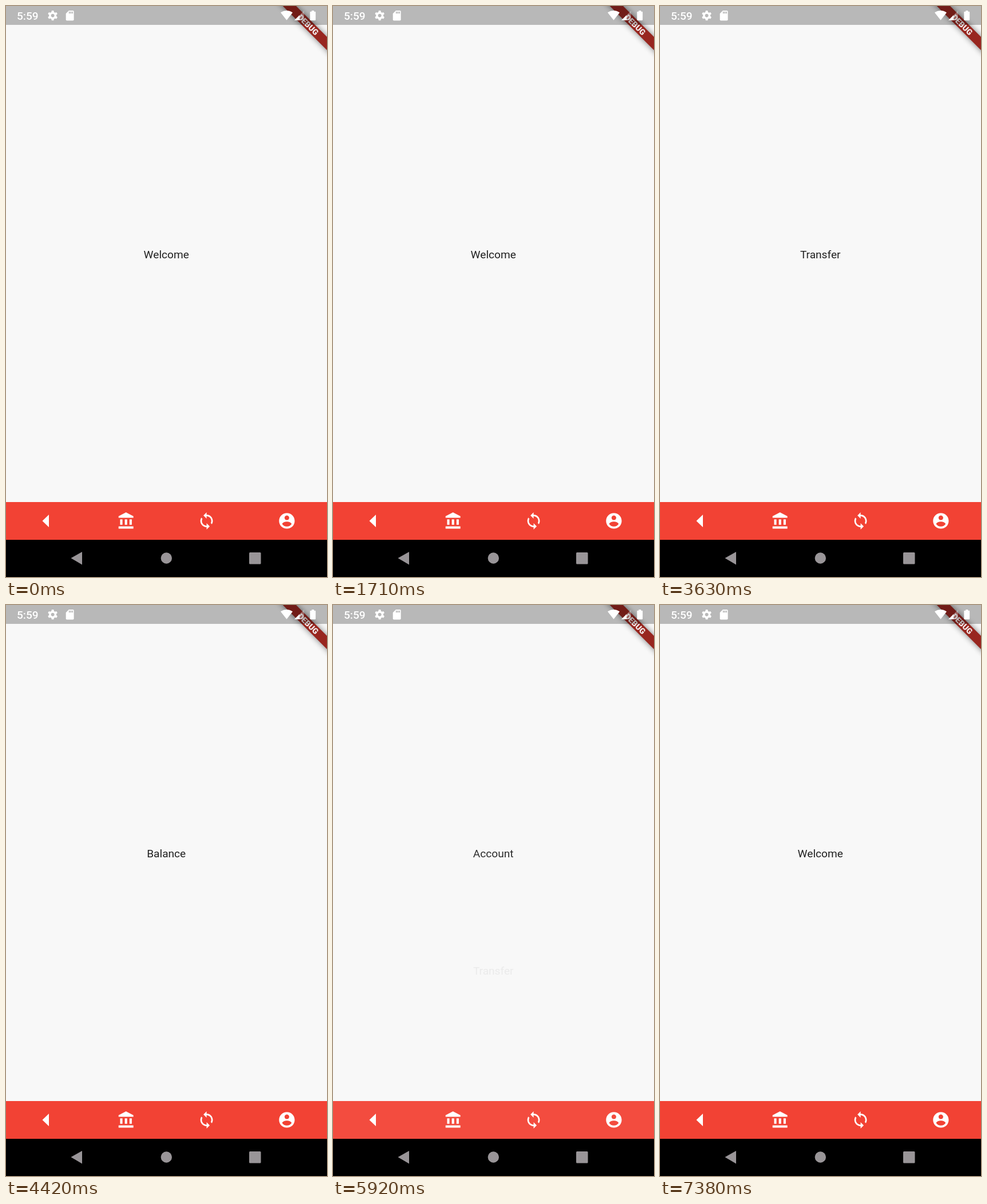
Animation of 561x998 px, one loop 7500 ms. Source, as an HTML page:

```html
<!DOCTYPE html>
<html lang="en">
<head>
<meta charset="utf-8">
<title>Page navigation</title>
<style>
html, body { margin: 0; width: 100%; height: 100%; overflow: hidden; background: #f8f8f8; }
svg { display: block; width: 561px; height: 998px; }
text { font-family: Roboto, sans-serif; }
.label { font-size: 19.1px; fill: #000; fill-opacity: .87; text-anchor: middle; }
.clock { font-size: 19.1px; font-weight: 500; fill: #fff; }
.debug { font-size: 13.9px; font-weight: 900; fill: #f4eeee; text-anchor: middle; }
</style>
</head>
<body>
<svg viewBox="0 0 561 998">
  <defs>
    <filter id="blur" x="-30%" y="-150%" width="160%" height="400%">
      <feGaussianBlur stdDeviation="5.2"/>
    </filter>
    <g id="bar">
      <rect y="867" width="561" height="66" fill="#f24234"/>
      <g fill="#fff">
        <path d="M63.5 900L75 889V911Z"/>
        <path transform="translate(194 883.6) scale(1.364)" d="M4 10v7h3v-7H4zm6 0v7h3v-7h-3zM2 22h19v-3H2v3zm14-12v7h3v-7h-3zm-4.5-9L2 6v2h19V6l-9.5-5z"/>
        <path transform="translate(334.2 883.6) scale(1.364)" d="M12 4V1L8 5l4 4V6c3.31 0 6 2.69 6 6 0 1.01-.25 1.97-.7 2.8l1.46 1.46C19.54 15.03 20 13.57 20 12c0-4.42-3.58-8-8-8zm0 14c-3.31 0-6-2.69-6-6 0-1.01.25-1.97.7-2.8L5.24 7.74C4.46 8.97 4 10.43 4 12c0 4.42 3.58 8 8 8v3l4-4-4-4v3z"/>
        <path transform="translate(474.5 883.6) scale(1.364)" d="M12 2C6.48 2 2 6.48 2 12s4.48 10 10 10 10-4.48 10-10S17.52 2 12 2zm0 3c1.66 0 3 1.34 3 3s-1.34 3-3 3-3-1.34-3-3 1.34-3 3-3zm0 14.2c-2.5 0-4.71-1.28-6-3.22.03-1.99 4-3.08 6-3.08 1.99 0 5.97 1.09 6 3.08-1.29 1.94-3.5 3.22-6 3.22z"/>
      </g>
    </g>
    <path id="tooth" d="M-2.4 -5L-1.7 -8.6H1.7L2.4 -5Z"/>
  </defs>

  <g id="pages"></g>

  <g transform="translate(561 0) rotate(45)">
    <rect x="-70" y="38.2" width="140" height="16.4" opacity=".5" filter="url(#blur)"/>
    <rect x="-70" y="38.2" width="140" height="16.4" fill="#98261f"/>
    <text class="debug" x="0" y="51.4">DEBUG</text>
  </g>

  <rect width="561" height="33" fill-opacity=".26"/>
  <text class="clock" x="19" y="24">5:59</text>
  <g fill="#fff">
    <g id="gear" transform="translate(81.6 16.7)">
      <circle r="4.7" fill="none" stroke="#fff" stroke-width="3.4"/>
    </g>
    <path transform="translate(101.2 6.3) scale(.87)" d="M18 2h-8L4.02 8 4 20c0 1.1.9 2 2 2h12c1.1 0 2-.9 2-2V4c0-1.1-.9-2-2-2zm-6 6h-2V4h2v4zm3 0h-2V4h2v4zm3 0h-2V4h2v4z"/>
    <path transform="translate(479.7 5.3) scale(.9)" d="M12.01 21.49L23.64 7c-.45-.34-4.93-4-11.64-4C5.28 3 .81 6.66.36 7l11.63 14.49z"/>
    <path d="M504 25L521 8V25Z" opacity=".3"/>
    <path d="M504 25L513 16V25Z"/>
    <path transform="translate(524.5 6.3) scale(.98 .86)" d="M15.67 4H14V2h-4v2H8.33C7.6 4 7 4.6 7 5.33v15.33C7 21.4 7.6 22 8.33 22h7.33c.74 0 1.34-.6 1.34-1.33V5.33C17 4.6 16.4 4 15.67 4z"/>
  </g>

  <rect y="933" width="561" height="65"/>
  <g fill="#999598">
    <path d="M113.5 965L133 954V976.500Z"/>
    <circle cx="280.3" cy="965" r="9.7"/>
    <rect x="425" y="955" width="20.500" height="20.500" rx="1.500"/>
  </g>
</svg>
<script>
const LOOP = 7500, SLIDE = 300, RISE = 233;

// Stack order; each page is pushed at "show" and popped at "hide"
const pages = [
  { name: 'Welcome' },
  { name: 'Account', show: 1750, hide: 6120 },
  { name: 'Transfer', show: 2850, hide: 5677 },
  { name: 'Balance', show: 4080, hide: 5251 }
];

const holder = document.getElementById('pages');
for (const page of pages) {
  page.el = document.createElementNS('http://www.w3.org/2000/svg', 'g');
  page.el.innerHTML = `<rect width="561" height="933" fill="#f8f8f8"/>
    <text class="label" x="280.2" y="440.7">${page.name}</text><use href="#bar"/>`;
  holder.append(page.el);
}

const gear = document.getElementById('gear');
for (let a = 0; a < 360; a += 60) {
  gear.insertAdjacentHTML('beforeend', `<use href="#tooth" transform="rotate(${a})"/>`);
}

const clamp = v => Math.min(1, Math.max(0, v));

// Cubic bezier easing with y handles 0 and 1
function bezier(x1, x2) {
  return x => {
    let lo = 0, hi = 1, s = x;
    for (let i = 0; i < 24; i++) {
      s = (lo + hi) / 2;
      const r = 1 - s;
      const bx = 3 * x1 * s * r * r + 3 * x2 * s * s * r + s * s * s;
      if (bx < x) lo = s; else hi = s;
    }
    return s * s * (3 - 2 * s);
  };
}
const slideEase = bezier(.4, .2);
const fadeEase = bezier(.42, 1);

// Hold each picture on a 24 fps grid
function snap(t) {
  if (t < 90) return 0;
  const d = (t - 90) % 250;
  const step = d >= 210 ? 210 : Math.min(160, Math.floor(d / 40) * 40);
  return t - d + step;
}

function draw(time) {
  const t = snap(time % LOOP);
  for (const { el, show, hide } of pages.slice(1)) {
    const p = clamp((t - show) / SLIDE) - clamp((t - hide) / SLIDE);
    el.style.display = p > 0 ? '' : 'none';
    if (p <= 0) continue;
    const full = p >= 1;
    el.setAttribute('opacity', full ? 1 : fadeEase(p));
    el.setAttribute('transform', `translate(0 ${full ? 0 : RISE * (1 - slideEase(p))})`);
  }
}

const start = performance.now();
function tick() {
  draw(performance.now() - start);
  requestAnimationFrame(tick);
}
tick();
</script>
</body>
</html>
```
